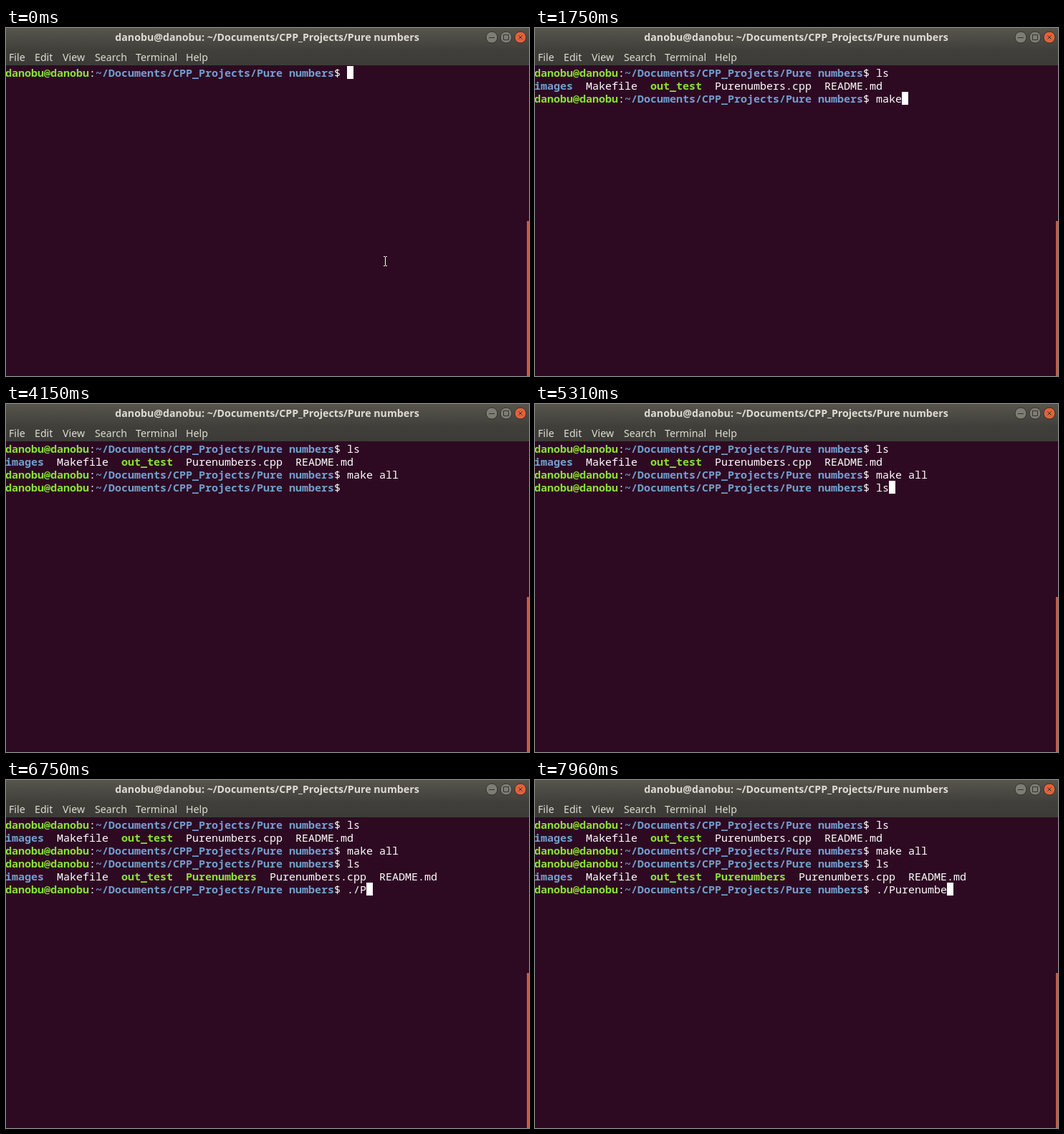
These frames come from a looping animation (730 by 485 pixels, 8000 ms). An HTML page:

```html
<!DOCTYPE html>
<html lang="en">
<head>
<meta charset="utf-8">
<title>Terminal</title>
<style>
  html, body { margin: 0; width: 100%; height: 100%; overflow: hidden; background: #2d0a22; }
  svg { display: block; }
  .ui { font: 14.2px "Noto Sans", "Open Sans", sans-serif; fill: #dfdbd2; }
  .title { font-weight: 700; text-anchor: middle; }
  #screen { font: 15px "Noto Sans Mono", "Liberation Mono", monospace; }
  .plain { fill: #fff; }
  .green { fill: #8ae234; font-weight: 700; }
  .blue { fill: #729fcf; font-weight: 700; }
</style>
</head>
<body>
<svg id="stage" width="730" height="485" viewBox="0 0 730 485">
  <defs>
    <linearGradient id="bar" x1="0" y1="0" x2="0" y2="1">
      <stop offset="0" stop-color="#57554c"/>
      <stop offset=".6" stop-color="#403f3a"/>
      <stop offset="1" stop-color="#3c3b37"/>
    </linearGradient>
  </defs>
  <rect width="730" height="485" fill="#2d0a22"/>
  <rect width="730" height="52" fill="url(#bar)"/>
  <text class="ui title" x="364.5" y="18">danobu@danobu: ~/Documents/CPP_Projects/Pure numbers</text>
  <g class="ui">
    <text x="4" y="46">File</text>
    <text x="40" y="46">Edit</text>
    <text x="79" y="46">View</text>
    <text x="124" y="46">Search</text>
    <text x="181" y="46">Terminal</text>
    <text x="251" y="46">Help</text>
  </g>
  <g stroke="#33322e" fill="#7e7c73">
    <circle cx="678" cy="13" r="8"/>
    <circle cx="698" cy="13" r="8"/>
    <circle cx="718" cy="13" r="8" fill="#e2623c"/>
    <path d="M674 13.5h8M694.5 9.5h7v7h-7zM715.5 10.5l5 5m0-5l-5 5" fill="none"/>
  </g>
  <rect x="727" y="269" width="3" height="216" fill="#c75b45"/>
  <g id="screen"></g>
  <rect id="cursor" x="-1" y="53" width="9" height="18" fill="#fff"/>
  <path id="pointer" d="M527 318.5h2M530 318.5h2M529.5 319v12M527 331.5h2M530 331.5h2" stroke="#fff" fill="none"/>
</svg>
<script>
const LOOP = 8000, CELL = 9, LINE = 18, PROMPT_END = 53;
const screen = document.getElementById("screen");
const cursor = document.getElementById("cursor");

// Plays a list of [time, style] as hard changes.
function play(el, steps) {
  const frames = steps.map(([time, style]) => ({ ...style, offset: time / LOOP, easing: "step-end" }));
  frames.push({ ...steps.at(-1)[1], offset: 1 });
  el.animate(frames, { duration: LOOP, iterations: Infinity });
}

const hidden = { visibility: "hidden" }, visible = { visibility: "visible" };

function put(time, row, col, text, style = "plain") {
  const el = document.createElementNS("http://www.w3.org/2000/svg", "text");
  el.setAttribute("x", col * CELL - 1);
  el.setAttribute("y", 68 + row * LINE);
  el.setAttribute("class", style);
  el.textContent = text;
  screen.append(el);
  if (time) play(el, [[0, hidden], [time, visible]]);
}

const cursorSteps = [];
function moveCursor(time, row, col, on = true) {
  cursorSteps.push([time, {
    transform: `translate(${col * CELL}px, ${row * LINE}px)`,
    visibility: on ? "visible" : "hidden"
  }]);
}

function prompt(time, row, cursorOn = true) {
  put(time, row, 0, "danobu@danobu", "green");
  put(time, row, 13, ":");
  put(time, row, 14, "~/Documents/CPP_Projects/Pure numbers", "blue");
  put(time, row, 51, "$");
  moveCursor(time, row, PROMPT_END, cursorOn);
}

function type(row, text, times) {
  times.forEach((time, i) => {
    put(time, row, PROMPT_END + i, text[i]);
    moveCursor(time, row, PROMPT_END + i + 1);
  });
}

function list(time, row, files) {
  let col = 0;
  for (const [name, style] of files) {
    put(time, row, col, name, style);
    col += name.length + 2;
  }
}

const before = [["images", "blue"], ["Makefile"], ["out_test", "green"]];
const after = [["Purenumbers.cpp"], ["README.md"]];

prompt(0, 0);
type(0, "ls", [590, 730]);
list(920, 1, [...before, ...after]);

prompt(920, 2);
type(2, "make all", [1480, 1570, 1660, 1750, 1890, 2350, 2540, 2680]);
moveCursor(3230, 2, 61, false);
moveCursor(3460, 2, 61);
moveCursor(3510, 3, 0);
moveCursor(4060, 3, 0, false);

prompt(4150, 3, false);
moveCursor(4660, 3, PROMPT_END);
type(3, "ls", [5170, 5310]);
list(5450, 4, [...before, ["Purenumbers", "green"], ...after]);

prompt(5450, 5);
moveCursor(6010, 5, PROMPT_END, false);
type(5, "./Purenumbe", [6290, 6330, 6750, 7030, 7120, 7210, 7300, 7490, 7680, 7770, 7960]);

play(cursor, cursorSteps);
play(document.getElementById("pointer"), [[0, visible], [550, hidden]]);
</script>
</body>
</html>
```
